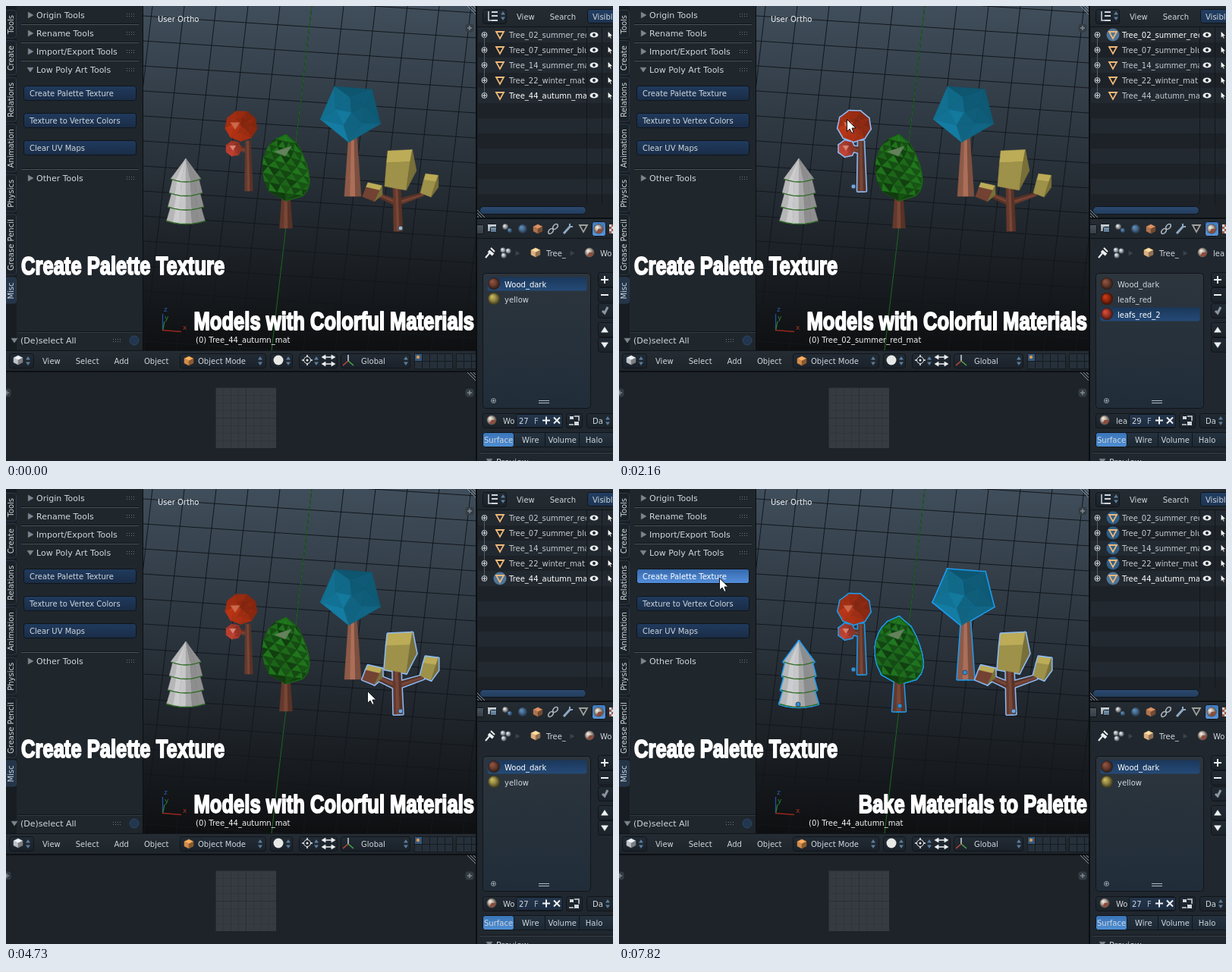
Recreate the animation shown at these times as an HTML page with a canvas. Size 800 px wide and 600 px high, loop 8 s.

```html
<!DOCTYPE html>
<html lang="en">
<head>
<meta charset="utf-8">
<title>Create Palette Texture</title>
<style>
html, body { margin: 0; width: 100%; height: 100%; overflow: hidden; background: #1e242a; }
canvas { display: block; width: 800px; height: 600px; }
</style>
</head>
<body>
<canvas id="stage" width="800" height="600"></canvas>
<script>
const c = document.getElementById('stage').getContext('2d');
const LOOP = 8000;
const INK = '#d0d7dd', WHITE = '#eef1f3', SHADOW = '#10151a';
let glow = null; // outline colour while a selected tree is traced

// ---------- drawing helpers ----------
function seeded(s) {
  return () => (s = (s * 16807) % 2147483647) / 2147483647;
}
const tint = (rgb, k) => `rgb(${rgb.map(v => Math.min(255, Math.round(v * k))).join(',')})`;

function text(str, x, y, color = INK, size = 10) {
  c.font = `${size}px "DejaVu Sans", sans-serif`;
  c.fillStyle = color;
  c.fillText(str, x, y);
  return c.measureText(str).width;
}
function menu(words, x, y, gap) {
  for (const w of words) x += text(w, x, y) + gap;
}
function rect(x, y, w, h, color) {
  c.fillStyle = color;
  c.fillRect(x, y, w, h);
}
function box(x, y, w, h, top, bottom = top, r = 3, edge = SHADOW) {
  const g = c.createLinearGradient(0, y, 0, y + h);
  g.addColorStop(0, top);
  g.addColorStop(1, bottom);
  c.beginPath();
  c.roundRect(x + .5, y + .5, w - 1, h - 1, r);
  c.fillStyle = g;
  c.fill();
  if (edge) { c.strokeStyle = edge; c.lineWidth = 1; c.stroke(); }
}
const widget = (x, y, w) => box(x, y, w, 20, '#222b34', '#1a2129');
function rule(x, y, w, light = '#4a535a') {
  rect(x, y - 1, w, 1, SHADOW);
  rect(x, y, w, 1, light);
}
function poly(color, ...points) {
  c.beginPath();
  for (const [x, y] of points) c.lineTo(x, y);
  c.closePath();
  c.fillStyle = color;
  c.strokeStyle = glow || color;
  c.lineWidth = glow ? 3.6 : .5;
  c.fill();
  c.stroke();
}
function line(color, w, ...p) {
  c.beginPath();
  for (let i = 0; i < p.length; i += 2) c.lineTo(p[i], p[i + 1]);
  c.strokeStyle = color;
  c.lineWidth = w;
  c.stroke();
}
function dot(x, y, r, color, edge) {
  c.beginPath();
  c.arc(x, y, r, 0, 7);
  c.fillStyle = color;
  c.fill();
  if (edge) { c.strokeStyle = edge; c.lineWidth = 1; c.stroke(); }
}
function sphere(x, y, r, rgb) {
  const g = c.createRadialGradient(x - r * .35, y - r * .4, 0, x, y, r);
  g.addColorStop(0, tint(rgb, 1.25));
  g.addColorStop(.5, tint(rgb, .9));
  g.addColorStop(1, tint(rgb, .35));
  dot(x, y, r, g);
}
const down = (x, y, s, color) => poly(color, [x - s, y - s * .7], [x + s, y - s * .7], [x, y + s * .8]);
const up = (x, y, s, color) => poly(color, [x - s, y + s * .7], [x + s, y + s * .7], [x, y - s * .8]);
const right = (x, y, s, color) => poly(color, [x - s * .7, y - s], [x - s * .7, y + s], [x + s, y]);
function updown(x, y) {
  up(x, y - 3.5, 2.5, '#5c7f9f');
  down(x, y + 3.5, 2.5, '#5c7f9f');
}
function plus(x, y, s, color, w = 2) {
  line(color, w, x - s, y, x + s, y);
  line(color, w, x, y - s, x, y + s);
}
function cross(x, y, s) {
  line(WHITE, 2, x - s, y - s, x + s, y + s);
  line(WHITE, 2, x + s, y - s, x - s, y + s);
}
function toggle(x, y) {
  box(x - 6, y - 6, 12, 12, '#343c43', '#343c43', 4, null);
  plus(x, y, 3, '#7f8990', 1.5);
}
function grip(x, y) {
  for (let i = 0; i < 8; i++) rect(x + (i % 4) * 3, y - 2 + (i >> 2) * 3, 1, 1, '#6d757c');
}
function hatch(x, y, sx, sy) {
  for (let i = 3; i < 14; i += 4) line('#88919a', 1, x, y + sy * i, x + sx * i, y);
}
function meshIcon(x, y, color) {
  c.beginPath();
  c.moveTo(x - 5, y - 4);
  c.lineTo(x + 5, y - 4);
  c.lineTo(x, y + 5);
  c.closePath();
  c.strokeStyle = color;
  c.lineWidth = 1.8;
  c.stroke();
}
function arrow(x, y, s = 1) {
  c.save();
  c.translate(x, y);
  c.scale(s, s);
  c.beginPath();
  c.moveTo(.5, .5);
  for (const [px, py] of [[.5, 16.5], [4, 13], [7, 18.5], [9, 17.5], [7, 12], [12, 12]]) c.lineTo(px, py);
  c.closePath();
  c.fillStyle = '#ffffff';
  c.strokeStyle = '#15181b';
  c.lineWidth = 1;
  c.fill();
  c.stroke();
  c.restore();
}

// ---------- low poly solids ----------
function cube(x, y, s, rgb) {
  const h = s / 2;
  poly(tint(rgb, 1.25), [x, y - s], [x + s, y - h], [x, y], [x - s, y - h]);
  poly(tint(rgb, 1), [x - s, y - h], [x, y], [x, y + s], [x - s, y + h]);
  poly(tint(rgb, .65), [x + s, y - h], [x, y], [x, y + s], [x + s, y + h]);
}
function gem(x, y, r, n, rgb, turn, seed) {
  const rnd = seeded(seed);
  const at = (i, k, spin) => {
    const a = turn + spin + i / n * Math.PI * 2;
    return [x + r * k * Math.cos(a), y + r * k * Math.sin(a) * .95];
  };
  const outer = i => at(i, 1, 0), inner = i => at(i, .5, .45);
  for (let i = 0; i < n; i++) {
    const lit = .86 + .14 * Math.cos(turn + (i + .5) / n * Math.PI * 2 - 2.4);
    const tone = () => tint(rgb, lit + rnd() * .14);
    poly(tone(), outer(i), outer(i + 1), inner(i));
    poly(tone(), outer(i + 1), inner(i), inner(i + 1));
    poly(tone(), inner(i), inner(i + 1), [x, y]);
  }
}
function limb(rgb, x0, y0, x1, y1, w0, w1) {
  const len = Math.hypot(x1 - x0, y1 - y0), nx = (y1 - y0) / len, ny = (x0 - x1) / len;
  [.82, 1, .72].forEach((k, i) => {
    const a = i / 3 - .5, b = a + 1 / 3;
    const p = (x, y, w, u) => [x + nx * w * u, y + ny * w * u];
    poly(tint(rgb, k), p(x0, y0, w0, a), p(x0, y0, w0, b), p(x1, y1, w1, b), p(x1, y1, w1, a));
  });
}
function block(x, y, w, h, turn, rgb, front = rgb) {
  const face = (color, ...pts) => poly(color, ...pts.map(([u, v]) => [u * w, v * h]));
  c.save();
  c.translate(x, y);
  c.rotate(turn);
  face(tint(rgb, 1.12), [-.4, -.5], [.37, -.53], [.3, -.22], [-.44, -.2]);
  face(tint(front, .94), [-.44, -.2], [.3, -.22], [.18, .5], [-.5, .4]);
  face(tint(rgb, .72), [.37, -.53], [.5, 0], [.18, .5], [.3, -.22]);
  c.restore();
}
// swirling rows of leaf facets inside an egg profile
function foliage(x, top, bottom, radius, rgb) {
  const rnd = seeded(41), rows = 9, cols = 4;
  const at = (row, k) => {
    const v = Math.max(0, Math.min(1, row / rows));
    const u = Math.max(-1, Math.min(1, (k + (row & 1) * .5) / cols * 2 - 1));
    const r = radius * Math.sin(Math.PI * v ** 1.35) ** .4;
    return [x + u * r, top + (bottom - top) * v + 9 * u * Math.sin(Math.PI * v)];
  };
  for (let row = 0; row < rows; row++)
    for (let k = -1; k <= cols; k++) {
      const shift = row & 1;
      poly(tint(rgb, .5 + rnd() * .25), at(row, k), at(row, k + 1), at(row + 1, k + shift));
      poly(tint(rgb, .85 + rnd() * .2), at(row, k + 1), at(row + 1, k + shift), at(row + 1, k + 1 + shift));
    }
}
function snowTier(x, top, base, a, b, rgb) {
  const dip = u => base + 3 - 4 * u * u, edge = [];
  for (let i = 0; i < 6; i++) {
    const u = i / 3 - 1, v = u + 1 / 3;
    poly(tint(rgb, .84 + .17 * Math.cos(i - 1.3)), [x + a * u, top], [x + a * v, top], [x + b * v, dip(v)], [x + b * u, dip(u)]);
    edge.push(x + b * u, dip(u), x + b * v, dip(v));
  }
  if (!glow) line('#2b6a1f', 1.3, ...edge);
}

// ---------- trees ----------
const WOOD = [122, 70, 54], RED = [170, 48, 18], ROSE = [184, 62, 46], GREEN = [32, 116, 28],
      BLUE = [18, 112, 146], YELLOW = [168, 154, 78], PALE = [172, 110, 88], SNOW = [205, 205, 207];

const trees = [
  { name: 'Tree_02_summer_red_mat', origin: [309, 238], pick: 2, users: 29,
    mats: [['Wood_dark', WOOD], ['leafs_red', RED], ['leafs_red_2', ROSE]],
    draw() {
      limb(WOOD, 307, 188, 318, 190, 6, 8);
      limb(WOOD, 319, 178, 320, 244, 7, 11);
      gem(310, 158, 21.5, 9, RED, .2, 5);
      down(302, 158, 6, '#c9694a');
      gem(300, 188, 11, 7, ROSE, 0, 9);
      down(299, 187, 4, '#d98573');
    } },
  { name: 'Tree_07_summer_blue_mat', origin: [456, 242], pick: 1, users: 49,
    mats: [['Wood_light', PALE], ['leafs_blue', BLUE]],
    draw() {
      limb(PALE, 457, 172, 457, 251, 11, 22);
      gem(455, 140, 42, 5, BLUE, -2.12, 3);
    } },
  { name: 'Tree_14_summer_mat', origin: [370, 286], pick: 1, users: 27,
    mats: [['leafs_1', GREEN], ['Wood_dark', WOOD]],
    draw() {
      limb(WOOD, 369, 252, 369, 293, 11, 17);
      foliage(369, 169, 257, 31, GREEN);
      poly('#64815b', [354, 192], [376, 185], [368, 198]);
    } },
  { name: 'Tree_22_winter_mat', origin: [236, 284], pick: 1, users: 6,
    mats: [['leafs_1', GREEN], ['snow', SNOW]],
    draw() {
      for (let i = 3; i >= 0; i--) {
        const base = 229 + 18.5 * i, r = 20 + 1.8 * i;
        snowTier(237, i ? base - 20 : 201, base, i ? r * .78 : 0, r, SNOW);
      }
    } },
  { name: 'Tree_44_autumn_mat', origin: [520, 293], pick: 0, users: 27,
    mats: [['Wood_dark', WOOD], ['yellow', YELLOW]],
    draw() {
      limb(WOOD, 519, 258, 550, 248, 8, 5);
      limb(WOOD, 513, 259, 490, 249, 8, 6);
      limb(WOOD, 515, 238, 517, 297, 10, 12);
      block(520, 217, 42, 52, 0, YELLOW);
      block(484, 246, 25, 22, .25, YELLOW, WOOD);
      block(559, 237, 22, 29, .18, YELLOW);
    } }
];

// ---------- timeline ----------
// [time, active tree, selection]
const picks = [[0, 4, 'none'], [1150, 3, 'one'], [2160, 0, 'one'], [3030, 2, 'one'],
               [3870, 1, 'one'], [4730, 4, 'one'], [5490, 4, 'none'], [5870, 4, 'all']];
// [start, end, steps, x, y, sideways bend]
const moves = [[310, 920, 9, 230, 245, -250], [1460, 1840, 6, 300, 149, 0], [2330, 2710, 6, 369, 202, 0],
               [3180, 3720, 8, 442, 135, 0], [4040, 4410, 6, 517, 218, 24], [4730, 5030, 5, 434, 316, 0],
               [6100, 6180, 2, 435, 313, 0], [6580, 7110, 8, 131, 123, 0], [7420, 7510, 2, 132, 117, 0]];

function pointer(t) {
  const i = moves.findLastIndex(m => t >= m[0]);
  if (i < 0) return null;
  const [a, b, n, x, y, bend] = moves[i];
  const [x0, y0] = i ? moves[i - 1].slice(3) : [556, 570];
  const step = Math.min(n, Math.floor((t - a) / (b - a) * (n - 1) + .3) + 1);
  const e = 1 - (1 - step / n) ** 3;
  return [Math.round(x0 + (x - x0) * e + bend * Math.sin(Math.PI * e)), Math.round(y0 + (y - y0) * e)];
}

// ---------- panels ----------
function viewport(active, selection) {
  const g = c.createLinearGradient(0, 0, 0, 454);
  g.addColorStop(0, '#404e5b');
  g.addColorStop(.5, '#272f37');
  g.addColorStop(1, '#0e0f11');
  c.save();
  c.beginPath();
  c.rect(181, 0, 438, 454);
  c.clip();
  rect(181, 0, 438, 454, g);
  for (let i = -6; i < 8; i++) line('#12171c', 1, 403 + i * 42, 0, 350 + i * 42, 454);
  for (let y = -20; y < 460; y += 33) line('#12171c', 1, 181, y, 619, y + 29);
  line('#1d6a22', 1, 403, 0, 350, 454);

  c.lineJoin = 'round';
  for (const i of [0, 1, 3, 2, 4]) {
    if (selection === 'all' || selection === 'one' && i === active) {
      glow = i === active ? '#8fbcf6' : '#1d9cf0';
      trees[i].draw();
      glow = null;
    }
    trees[i].draw();
  }
  c.lineJoin = 'miter';
  trees.forEach(({ origin }, i) => {
    if (i === active || selection === 'all')
      dot(...origin, 3, selection === 'none' ? '#a9b4bf' : i === active ? '#76a5dc' : '#2c8fd8', '#33485f');
  });

  text('User Ortho', 200, 21, '#f2f4f6');
  text(`(0) ${trees[active].name}`, 250, 444, '#f4f4f4');
  line('#2450a0', 1.3, 206.5, 406, 206.5, 428);
  line('#2c7a30', 1.3, 206.5, 428, 209, 416);
  line('#96281e', 1.3, 206, 427.5, 231, 429.5);
  text('z', 208, 403, '#2d5cb0', 9);
  text('y', 209, 414, '#2c8a34', 9);
  text('x', 233, 427, '#a83228', 9);
  toggle(611, 29);
  hatch(619, 0, -1, 1);
  c.restore();
}

function sideTabs() {
  let y = 5;
  rect(0, 0, 14, 454, '#171d22');
  for (const name of ['Tools', 'Create', 'Relations', 'Animation', 'Physics', 'Grease Pencil', 'Misc']) {
    c.font = '10px "DejaVu Sans", sans-serif';
    const h = c.measureText(name).width + 13;
    box(-3, y, 17, h, name === 'Misc' ? '#24354a' : '#1b2228', undefined, 3, '#2c3a48');
    c.save();
    c.translate(10, y + h - 6);
    c.rotate(-Math.PI / 2);
    text(name, 0, 0);
    c.restore();
    y += h + 2.5;
  }
}

function toolShelf(cursor, pressed) {
  rect(0, 0, 181, 454, '#1f262c');
  sideTabs();
  ['Origin Tools', 'Rename Tools', 'Import/Export Tools', 'Low Poly Art Tools', 'Other Tools'].forEach((name, i) => {
    const y = i < 4 ? 12 + 24 * i : 227;
    (i === 3 ? down : right)(32, y, 4, '#7d868d');
    text(name, 40, y + 4, INK, 11);
    grip(159, y);
    if (i) rule(20, y - 12, 155);
  });
  ['Create Palette Texture', 'Texture to Vertex Colors', 'Clear UV Maps'].forEach((name, i) => {
    const y = 105 + 36 * i;
    const over = cursor && cursor[0] > 24 && cursor[0] < 171 && cursor[1] > y && cursor[1] < y + 18;
    const tone = over && pressed ? ['#3568ac', '#5590dc'] : over ? ['#2c4a70', '#223a5a'] : ['#203b5e', '#1a2c46'];
    box(23, y, 149, 20, ...tone);
    text(name, 31, y + 14, over ? '#ffffff' : INK);
  });
  rule(15, 430, 165, '#333c43');
  down(11, 441, 4, '#7d868d');
  text('(De)select All', 19, 445, INK, 11);
  grip(141, 441);
  dot(169, 441, 6, '#22364f', '#2c4766');
  rect(180, 0, 1, 454, '#0c0f12');
}

function viewHeader() {
  box(-2, 454, 623, 28, '#252c33', '#1d242a', 0);
  widget(4, 458, 33);
  cube(16, 467, 6, [190, 196, 200]);
  menu(['View', 'Select', 'Add', 'Object'], 48, 472, 20);
  widget(229, 458, 114);
  cube(241, 468, 6, [210, 140, 74]);
  text('Object Mode', 253, 472);
  widget(348, 458, 30);
  dot(359, 467, 6.5, '#e8e8e6');
  widget(386, 458, 51);
  plus(397, 467, 7, WHITE, 1.5);
  dot(397, 467, 4.5, '#1d242b', WHITE);
  dot(397, 467, 1.5, WHITE);
  for (const y of [463, 472]) {
    line(WHITE, 1.5, 420, y, 430, y);
    right(431, y, 3, WHITE);
    right(419, y, -3, WHITE);
  }
  widget(441, 458, 92);
  line(INK, 1.5, 451, 460, 451, 468);
  line('#c44a36', 1.5, 451, 468, 444, 474);
  line('#4fa84c', 1.5, 451, 468, 458, 474);
  text('Global', 468, 472);
  for (const x of [29, 335, 372, 409, 527]) updown(x, 468);
  for (let i = 0; i < 16; i++) {
    const x = 538 + (i % 8) * 10 + (i % 8 > 4 ? 5 : 0);
    box(x, 458 + (i >> 3) * 10, 11, 11, i ? '#26303a' : '#35587e', undefined, 0, '#141a20');
  }
  dot(543, 463, 2.2, '#d89a52');
}

function imageEditor() {
  rect(0, 482, 620, 118, '#1e232a');
  rect(0, 481, 620, 2, '#0d1013');
  rect(276, 503, 80, 80, '#363b42');
  for (let i = 0; i < 8; i++) {
    const tone = i % 4 ? '#30353b' : '#282d33';
    rect(276 + i * 10, 503, 1, 80, tone);
    rect(276, 503 + i * 10, 80, 1, tone);
  }
  toggle(611, 510);
  toggle(1, 510);
  hatch(619, 483, -1, 1);
}

function outliner(active, selection) {
  rect(620, 0, 180, 280, '#1c2228');
  for (let y = 28; y < 262; y += 40) rect(622, y, 178, 20, '#232930');
  box(620, -2, 181, 30, '#252c33', '#20272d', 0);
  widget(628, 4, 32);
  line(INK, 1.5, 636, 7, 636, 19, 640, 19);
  for (const y of [8, 13, 19]) rect(640, y - 1, 8, 2, INK);
  updown(655, 13);
  menu(['View', 'Search'], 673, 18, 20);
  box(766, 4, 40, 19, '#223f63', '#1d3452');
  text('Visible', 773, 18);
  trees.forEach((tree, i) => {
    const y = 38 + i * 20, on = selection === 'all' || selection === 'one' && i === active;
    if (i) line('#566069', 1, 630.5, y - 17, 630.5, y - 4);
    dot(630.5, y, 3.5, '#1c2228', INK);
    plus(630.5, y, 2.5, INK, 1.2);
    if (on) dot(651, y, 8.5, i === active ? '#4f7598' : '#2f5f88');
    meshIcon(651, y, '#efb878');
    c.save();
    c.beginPath();
    c.rect(622, y - 10, 143, 20);
    c.clip();
    text(tree.name, 663, y + 4, i === active ? '#ffffff' : '#c5cbd0');
    c.restore();
    c.beginPath();
    c.ellipse(775, y, 5.5, 3.6, 0, 0, 7);
    c.fillStyle = WHITE;
    c.fill();
    dot(775, y, 2, '#20262c');
    arrow(793, y - 5, .55);
  });
  for (const x of [765, 785]) rect(x, 28, 1, 234, '#12171b');
  box(624, 264, 141, 11, '#2b4a70', '#223c5c', 5);
  hatch(621, 280, 1, -1);
}

function materialBall(x, y) {
  sphere(x, y, 6.5, [205, 195, 185]);
  poly('#8c4d3c', [x, y], [x + 6, y], [x + 3, y + 5], [x - 3, y + 5]);
}

function propertyHeader() {
  box(620, 280, 181, 27, '#252c33', '#1e252b', 0);
  box(619, 288, 11, 13, '#4c565e', '#343d45', 1);
  box(634, 287, 13, 11, INK, '#8f9aa4', 1);
  box(638, 291, 9, 8, '#7e98b0', '#566f88', 1);
  sphere(658, 291, 4, [190, 196, 200]);
  sphere(664, 296, 3.5, [80, 120, 160]);
  sphere(681, 294, 6.5, [80, 118, 155]);
  cube(701, 294, 6, [176, 116, 78]);
  for (const d of [-3, 3]) {
    c.beginPath();
    c.ellipse(721 + d, 294 - d, 4, 2.6, -.8, 0, 7);
    c.lineWidth = 1.6;
    c.strokeStyle = '#a9b4bd';
    c.stroke();
  }
  line('#8fa9c4', 3, 735, 300, 744, 290);
  line('#8fa9c4', 2, 743, 287, 743, 291, 747, 291);
  meshIcon(761, 293, '#a0a09c');
  box(772, 284, 19, 20, '#3f78bb', '#5a96da');
  materialBall(781, 294);
  for (let i = 0; i < 8; i++) rect(795 + i % 2 * 3, 288 + (i >> 1) * 3, 3, 3, (i + (i >> 1)) % 2 ? '#a6584a' : INK);
}

function materialList({ mats, pick }) {
  box(628, 352, 143, 179, '#2d353d', '#202d39', 4);
  mats.forEach(([name, rgb], i) => {
    const y = 367 + i * 20, on = i === pick;
    if (on) box(634, y - 10, 132, 19, '#1b375a', '#254b78', 3, null);
    sphere(643, y - 1, 8, rgb);
    text(name, 657, y + 4, on ? '#ffffff' : INK);
  });
  dot(642.5, 520.5, 3, '#25303a', '#98a3ac');
  plus(642.5, 520.5, 2, '#98a3ac', 1);
  for (const y of [520, 523]) rect(702, y, 14, 1, '#b5bdc4');
  for (const y of [351, 371, 392, 417, 437]) widget(780, y, 24);
  plus(789, 361, 5, WHITE);
  line(WHITE, 2, 784, 381, 794, 381);
  line('#8b979f', 3, 786, 402, 789, 405, 793, 397);
  up(789, 427, 4.5, WHITE);
  down(789, 447, 4.5, WHITE);
}

function properties(tree) {
  const name = tree.mats[tree.pick][0];
  const short = name.slice(0, name[0] === 'W' ? 2 : 3);
  rect(620, 279, 180, 321, '#20272e');
  propertyHeader();
  line(WHITE, 2, 632, 332, 637, 326);
  line(WHITE, 4, 636, 323, 642, 328);
  line(WHITE, 2, 639, 319, 644, 324);
  for (const [x, y] of [[655, 322], [662, 323], [656, 329]]) sphere(x, y, 3.7, [190, 200, 210]);
  for (const x of [674, 746]) right(x, 326, 3, '#39444d');
  cube(698, 325, 6, [222, 176, 128]);
  text('Tree_', 712, 330);
  materialBall(769, 325);
  text(short, 783, 330);
  materialList(tree);

  widget(628, 537, 106);
  box(672, 538, 62, 18, '#24364c', '#1d2c40', 2);
  materialBall(640, 546);
  text(short, 655, 551);
  text(String(tree.users), 676, 551);
  text('F', 696, 551, '#9fb0bf');
  plus(712, 546.5, 5, WHITE);
  cross(726, 546.5, 4);
  widget(738, 537, 22);
  box(742, 540, 7, 6, INK, INK, 1);
  box(748, 547, 8, 7, INK, INK, 1);
  line(INK, 1.5, 749, 541, 755, 541, 755, 547);
  line(INK, 1.5, 742, 552, 748, 552);
  widget(765, 537, 40);
  text('Da', 773, 551);
  updown(793, 547);

  box(628, 562, 178, 20, '#253340', '#1c2833');
  box(628, 562, 42, 20, '#3a74b8', '#4f8fd4');
  menu(['Surface', 'Wire', 'Volume', 'Halo'], 630, 576, 12);
  for (const x of [710, 755]) rect(x, 563, 1, 18, SHADOW);
  rule(624, 589, 176, '#3a434b');
  down(637, 600, 4, '#7d868d');
  text('Preview', 646, 605, INK, 11);
  rect(619, 0, 2, 600, '#0c0f12');
  rect(620, 279, 180, 2, '#0c0f12');
}

// heavy condensed caption face
function caption(str, x, y, align) {
  c.save();
  c.translate(x, y);
  c.scale(.775, 1);
  c.font = 'bold 33px "Liberation Sans", Arial, sans-serif';
  c.textAlign = align;
  c.lineJoin = 'round';
  c.lineWidth = 2;
  c.fillStyle = c.strokeStyle = '#ffffff';
  c.fillText(str, 0, 0);
  c.strokeText(str, 0, 0);
  c.restore();
}

function draw(t) {
  const [, active, selection] = picks.findLast(p => t >= p[0]);
  const cursor = pointer(t);
  viewport(active, selection);
  toolShelf(cursor, t >= 7820);
  viewHeader();
  imageEditor();
  outliner(active, selection);
  properties(trees[active]);
  caption('Create Palette Texture', 20, 354, 'left');
  caption(t < 6580 ? 'Models with Colorful Materials' : 'Bake Materials to Palette', 617, 427, 'right');
  if (cursor) arrow(...cursor);
}

const start = performance.now();
function tick() {
  draw((performance.now() - start) % LOOP);
  requestAnimationFrame(tick);
}
tick();
</script>
</body>
</html>
```
